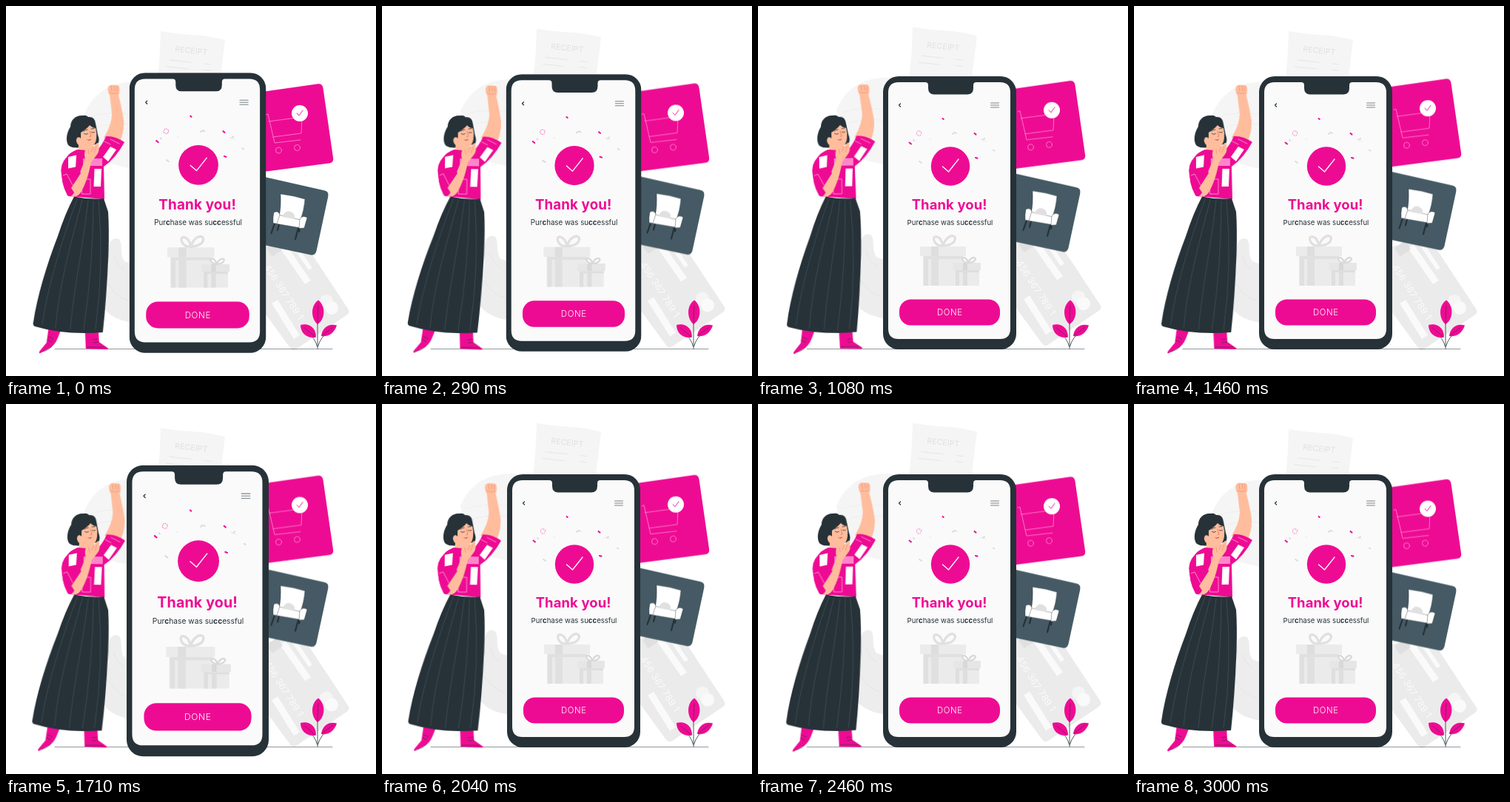
An HTML page without scripts that plays this animation: 500x500 px, repeating every 3.04 s.

```html
<!DOCTYPE html>
<html lang="en">
<head>
<meta charset="utf-8">
<title>Thank you</title>
<style>
  html, body { margin: 0; width: 100%; height: 100%; overflow: hidden; background: #fff; }
  svg { display: block; width: 100%; height: 100%; }
  text { font-family: Inter, "Open Sans", sans-serif; text-anchor: middle; }

  .pink { fill: #ee0b93; }
  .dark { fill: #263238; }
  .skin { fill: #ffbd9d; }
  .line { fill: none; stroke-linecap: round; stroke-linejoin: round; }

  .papers { animation: lift 1520ms -25ms infinite; }
  .cards { animation: drift 3040ms linear infinite; }
  .phone { transform-origin: 259px 279.5px; animation: beat 1520ms -27ms infinite; }
  .woman { transform-origin: 98px 288px; animation: sway 1520ms -25ms linear infinite; }

  @keyframes lift {
    0%, 100% { transform: translateY(0); animation-timing-function: ease-in-out; }
    50% { transform: translateY(-10px); animation-timing-function: ease-in-out; }
  }
  @keyframes drift {
    0% { transform: translateY(0); }
    20.7% { transform: translateY(-1.3px); }
    35.5% { transform: translateY(-4.2px); }
    48% { transform: translateY(-6.8px); }
    57% { transform: translateY(-8.6px); }
    66% { transform: translateY(-9.4px); }
    73% { transform: translateY(-8.7px); }
    81% { transform: translateY(-6.8px); }
    100% { transform: translateY(-3.2px); }
  }
  @keyframes beat {
    0%, 30%, 40%, 60%, 100% { transform: scale(1); }
    10%, 50% { transform: scale(1.1); }
  }
  @keyframes sway {
    0%, 100% { transform: rotate(0); }
    25% { transform: rotate(1deg); }
    75% { transform: rotate(-1deg); }
  }
</style>
</head>
<body>
<svg viewBox="0 0 500 500">
  <g class="papers">
    <!-- receipt -->
    <path fill="#f5f5f5" d="M209 34Q230 38 252 39T296 46L282 160H196Q206 100 208 60Z"/>
    <text transform="translate(250 64) rotate(6)" font-size="10.5" letter-spacing=".1" fill="#e0e0e0">RECEIPT</text>
    <path class="line" stroke="#e6e6e6" d="M221 73l29 3M268 78l9 1M217 82l29 3M267 86l9 1"/>
    <!-- left shapes -->
    <path fill="#f5f5f5" d="M185 103C145 100 119 115 106 146C112 176 121 196 139 211Q155 219 185 221Z"/>
    <path class="line" stroke="#ececec" stroke-width=".8" d="M114 150Q140 140 180 148M119 165Q145 155 180 162"/>
    <path fill="#ededed" d="M180 352L160 345C152 333 160 317 150 314C139 313 136 328 139 350L130 405Q142 426 180 429Z"/>
    <path class="line" stroke="#e2e2e2" stroke-width=".8" d="M146 338q4 13 14 19M138 375q12 20 28 23"/>
    <!-- bank card -->
    <path fill="#ebebeb" d="M330 330L398 312L462 409Q466 414 460 418L393 463Q388 467 384 462L330 388Z"/>
    <g fill="#fafafa">
      <path d="M370 327l8-5 34 49-8 5zM386 323l5-3 23 34-5 3zM359 402l8-5 30 48-8 5z"/>
      <circle cx="433" cy="399" r="9" fill="#f5f5f5"/>
      <circle cx="440" cy="408" r="9"/>
    </g>
    <rect x="354" y="321" width="18" height="14" rx="3" fill="#e0e0e0" transform="rotate(-35 363 328)"/>
    <text transform="translate(372 389) rotate(57)" font-size="12.5" fill="#fafafa" letter-spacing=".2">456 367 789 1</text>
  </g>

  <g class="cards">
    <path class="pink" d="M325 119L421.500 105.300Q427.500 104.500 428.500 111L442.200 206Q442.800 211.600 436.500 212.500L325 227Z"/>
    <g class="line" stroke="#ff8fd2" stroke-width=".8">
      <path d="M351 147l3-1 9 39 35-4M355 156l45-6-1 22-38 5"/>
      <circle cx="368.500" cy="195" r="4"/>
      <circle cx="393.500" cy="191.500" r="4"/>
    </g>
    <circle cx="397" cy="145" r="11" fill="#fff"/>
    <path class="line" stroke="#ee0b93" stroke-width=".9" d="M393 145l3 3 5-7"/>

    <path fill="#455a64" d="M325 225.500L430 249.300Q436.800 250.800 435.300 257.500L419.500 331Q418 337.500 411.500 336.300L325 318Z"/>
    <g transform="translate(0 1)">
      <path class="line" stroke="#263238" stroke-width="2.200" d="M363 293l-4.500 13M395 299l-4 15M397 298l-1 6M369 294l-2 8"/>
      <g fill="#fff" stroke="#263238" stroke-width=".4">
        <path d="M371 253Q388 255 404 260Q403 275 397 291L369 285Q372 270 371 253Z"/>
        <path d="M367 281L398 288L399 299L361 292.500Z"/>
        <path d="M362 278q6-3 8 3l-4 12-5-.7q-.5-8 1-14.300zM397 287q4-6 10-2l-4 14-7 .5z"/>
      </g>
      <path fill="#e0e0e0" d="M374 282q5-8 11-5 6 2 5 10l-16-3z"/>
    </g>
  </g>

  <path class="line" stroke="#263238" stroke-width=".5" d="M66 463.500H441"/>

  <g class="phone">
    <rect class="dark" x="169" y="95" width="180" height="369" rx="21"/>
    <path fill="#fafafa" d="M190 103H226Q230 103 230 107V111Q230 119.500 238 119.500H283Q291 119.500 291 111V107Q291 103 295 103H327Q341 103 341 117V436Q341 450 327 450H190Q176 450 176 436V117Q176 103 190 103Z"/>
    <path class="line" stroke="#263238" stroke-width="1.200" d="M192.500 132l-2 2 2 2"/>
    <path class="line" stroke="#7c8589" stroke-width="1" d="M314.500 131h11M314.500 134h11M314.500 137h11"/>

    <!-- confetti -->
    <g class="line" stroke="#ee0b93" stroke-width="2">
      <path d="M249.500 152l1.300 1M204.500 184.500l2.500 2M292.500 172l2 1.600M294 205l2.500.8"/>
      <circle cx="217.500" cy="172" r="3.200" stroke-width="1" stroke-dasharray=".6 1.900" opacity=".65"/>
    </g>
    <path class="line" stroke="#dcdcdc" stroke-width="2" d="M263 173q2-3 5-1M218 210l3 2M210 181l1 1M304 181l2-2M318 194.500l1.500 1"/>
    <path class="line" stroke="#e8e8e8" d="M301 180q4 0 7 3M232 180l2-1"/>

    <circle class="pink" cx="260" cy="216.500" r="26.200"/>
    <path class="line" stroke="#fff" stroke-width="1.300" d="M249.500 217l8 7L271 207"/>

    <text class="pink" x="258.700" y="275" font-size="18.400" font-weight="700" letter-spacing=".15">Thank you!</text>
    <text class="dark" x="259.500" y="295.700" font-size="9.600">Pur<tspan font-weight="700">c</tspan>hase was su<tspan font-weight="700">cc</tspan>essful</text>

    <!-- gifts -->
    <g fill="#ebebeb">
      <path d="M223 338h54v40h-54z"/>
      <path fill="#e0e0e0" d="M224 338h53v4h-53zM224 342h6v36h-6zM234 338h10v40h-10z"/>
      <path d="M219 325h62v13h-62z"/>
      <path fill="#dedede" d="M234 325h10v13h-10z"/>
      <path class="line" stroke="#e0e0e0" stroke-width="3.200" d="M250 324C238 325 234 311 241 311.500Q248 313 250 324C254 311 265 307 266.500 314Q266 323 250 324"/>
      <path d="M267 357h32v21h-32z"/>
      <path fill="#dedede" d="M267 357h32v3h-32zM267 360h5v18h-5zM277 357h6v21h-6z"/>
      <path fill="#e6e6e6" d="M264 347h37v10h-37z"/>
      <path fill="#d8d8d8" d="M277 347h6v10h-6z"/>
      <path class="line" stroke="#d9d9d9" stroke-width="2.200" d="M284 347C276 347 274 339 279 340Q283 342 284 347C287 340 293 338 294 342Q292 347 284 347"/>
    </g>

    <rect class="pink" x="191" y="396.500" width="136" height="35" rx="15.500"/>
    <text x="259.300" y="418" font-size="11.300" font-weight="300" letter-spacing=".6" fill="#fff">DONE</text>
  </g>

  <g class="woman">
    <!-- boots -->
    <path class="pink" d="M58 433L75 436L70 449Q66 459 58 463L46 469.500Q44 469 46 466L55 455Z"/>
    <path class="pink" d="M107 438H125L126 454Q133 459 138 462.300Q139 464 136 464L108 463Z"/>
    <path class="line" stroke="#263238" stroke-width=".6" d="M58 447l6 3M56 451l6 3M118 451l6-1M119 455l6-1M50 467q8-2 12-7M110 461h24"/>

    <!-- raised arm -->
    <path class="skin" d="M132 178Q143 160 143 146L140 121Q136 114 138 109Q141 105.500 146 107Q152 106 153 110Q154 116 152 121Q156 136 159 155Q160 170 153 185Z"/>
    <path class="line" stroke="#e0795a" stroke-width=".5" d="M142 108l1 7M146 107.500l1 7M150 108.500v6M140 117q6 3 11 0"/>

    <!-- hair and head -->
    <path class="dark" d="M104 148C94 147 87 154 87 163C82 171 80 181 84 188C89 193 97 191 103 192L117 188L124 186Q127 182 124 174L121 159Q120 149 111 150Q108 147 104 148Z"/>
    <path class="skin" d="M101 171Q109 166 113 161Q117 165 121 165Q123 172 122 179Q121 187 116 190L113 199L97 200L98 188Q93 183 96 178Q99 176 101 179Z"/>
    <path class="line" stroke="#263238" stroke-width=".8" d="M105.500 172.500q2.500 2 5 0M115.500 170.500q2 1.500 4 0M105 169q2-2 5-2M115 166l4-.5"/>
    <path class="line" stroke="#d9684d" stroke-width=".7" d="M113 169l2 7-2 .5"/>
    <path fill="#a23b3b" d="M108.500 180q4 1.500 7-.5-2 4-7 .5z"/>

    <!-- shirt -->
    <path class="pink" d="M96 194Q86 198 82 204Q72 214 75 229Q77 247 85 257L133 261L132 217Q148 206 160 184Q147 175 135 176Q130 188 122 196Z"/>
    <g fill="#fff">
      <path d="M131 204l10-14 8 4-11 16zM119.500 220h9.500l-1 24h-9.500z"/>
      <path fill="#ff85c9" d="M104 206h26v10h-26z"/>
      <path class="line" stroke="#ffc0e4" stroke-width=".7" d="M103 234h11v20h-11zM141 180l12 6M133 183l8 4"/>
    </g>

    <!-- hand at chin -->
    <path class="skin" d="M86 256C82 248 94 238 99 227L107 207C105 200 106 194 110 190L115 187L118 190L123 185Q126 185 125 190Q127 196 122 202L115 211C112 226 108 240 101 252Q94 261 86 256Z"/>
    <path class="line" stroke="#e0795a" stroke-width=".5" d="M118 190l-3 7M122 190l-3 8M111 194l1 6"/>
    <path class="pink" d="M76 218Q73 238 83 256Q88 260 92 252L88 246L101 226L95 211Z"/>
    <path fill="#fff" d="M84 204l11-2.500-1 16-10 2z"/>
    <path class="line" stroke="#ffc0e4" stroke-width=".7" d="M77 229l5-2 8 15"/>

    <!-- skirt -->
    <path class="dark" d="M92 257.500Q112 262 132 260L138 278Q139.500 300 138.500 335Q136 395 131 441Q80 445 39 433Q36 431 37 428C42 393 55 350 70 311Q80 280 92 257.500Z"/>
    <path class="line" stroke="#516069" stroke-width=".5" d="M96 261C78 310 57 375 49 431M103 262C88 320 72 375 67 435M111 263C104 325 92 380 87 437M118 263Q118 350 105 438M125 263Q133 350 121 437"/>
  </g>

  <!-- plant -->
  <path class="line" stroke="#263238" stroke-width=".8" d="M421 463V428M420.500 460Q418 449 406 439M421.500 460Q425 447 438 438"/>
  <g class="pink">
    <path d="M422 397.500C411 405 412 423 421 430C432 423 432 405 422 397.500Z"/>
    <path d="M398 431C398 443 408 450 419 447.500C419 435 410 428 398 431Z"/>
    <path d="M447 431.500C436 428.500 427 435 426 446C436 447.500 444 441.500 447 431.500Z"/>
  </g>
  <path class="line" stroke="#263238" stroke-width=".5" d="M421.800 405L421 430M403 434.500L417 446.500M442 434L427 445"/>
</svg>
</body>
</html>
```
